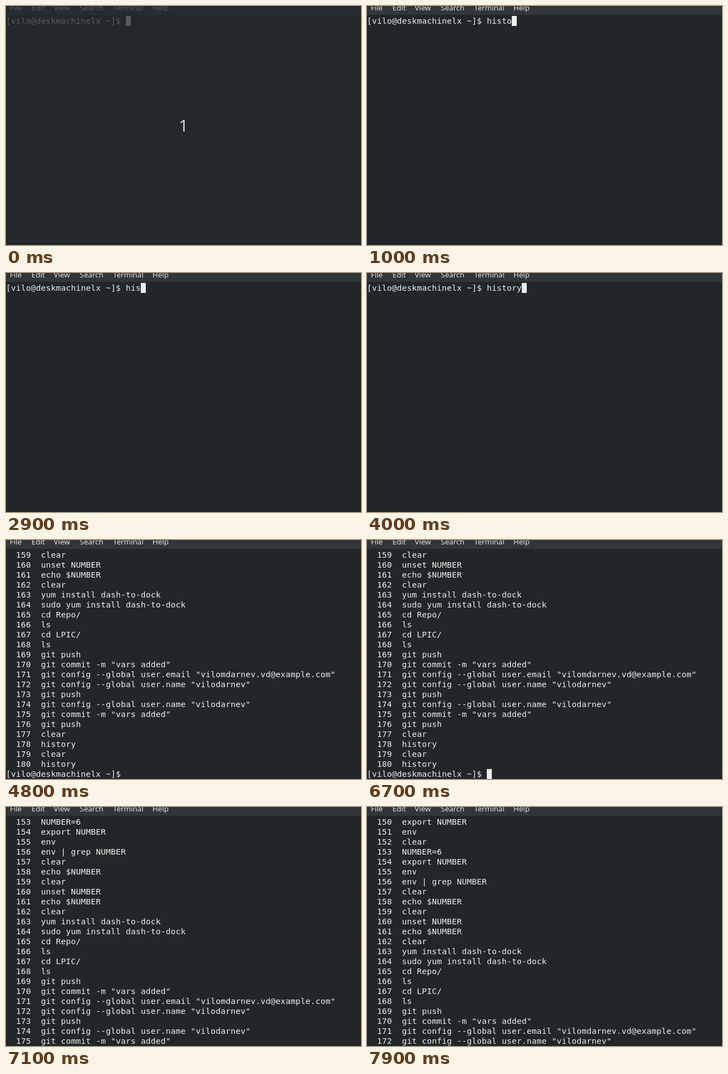
Animation of 640 by 432 pixels, one loop 8 s. Source, as an HTML page with a canvas:

```html
<!DOCTYPE html>
<html lang="en">
<head>
<meta charset="utf-8">
<title>Terminal history</title>
<style>
  html, body { margin: 0; height: 100%; overflow: hidden; background: #232629; }
  canvas { display: block; }
</style>
</head>
<body>
<canvas id="stage" width="640" height="432"></canvas>
<script>
const ctx = document.getElementById('stage').getContext('2d');
const LOOP = 8000, TICK = 100, CELL_W = 9, CELL_H = 18, TOP = 18, ROWS = 23;
const INK = '#eeeeec';
const UI_FONT = '"Open Sans", "Noto Sans", sans-serif';
const PROMPT = '[vilo@deskmachinelx ~]$ ';
const COMMAND = 'history';
const MENU = { File: 7, Edit: 46, View: 86, Search: 133, Terminal: 193, Help: 264 };

const FIRST = 150;
const history = `export NUMBER
env
clear
NUMBER=6
export NUMBER
env
env | grep NUMBER
clear
echo $NUMBER
clear
unset NUMBER
echo $NUMBER
clear
yum install dash-to-dock
sudo yum install dash-to-dock
cd Repo/
ls
cd LPIC/
ls
git push
git commit -m "vars added"
git config --global user.email "vilomdarnev.vd@example.com"
git config --global user.name "vilodarnev"
git push
git config --global user.name "vilodarnev"
git commit -m "vars added"
git push
clear
history
clear
history`.split('\n').map((cmd, i) => String(FIRST + i).padStart(5) + '  ' + cmd);
const output = [...history, PROMPT];

const OUTPUT_AT = 4200, PROMPT_AT = 4280;
const WHEEL = [7000, 7100, 7900], WHEEL_LINES = 3;
const BLINK_DELAY = 500, BLINK = 610;

// From each time on, the command is typed or deleted towards this length
const goals = [[0, 0], [300, 2], [800, 6], [1300, 7], [2500, 6], [2900, 0], [3200, 1], [3500, 7]];

// One key per tick forwards, up to three deletions per tick backwards
function typing(t) {
  let count = 0, lastKey = 0;
  for (let now = 0; now <= t; now += TICK) {
    const goal = goals.findLast(([start]) => start <= now)[1];
    if (count === goal) continue;
    count = goal > count ? count + 1 : Math.max(goal, count - 3);
    lastKey = now;
  }
  return { count, lastKey };
}

function cursorVisible(idle) {
  return idle < BLINK_DELAY || Math.floor((idle - BLINK_DELAY) / BLINK) % 2 === 1;
}

function rect(color, x, y, w, h) {
  ctx.fillStyle = color;
  ctx.fillRect(x, y, w, h);
}

function drawLine(text, row) {
  ctx.fillStyle = INK;
  [...text].forEach((ch, col) => ctx.fillText(ch, col * CELL_W, TOP + row * CELL_H + 14));
}

function drawCursor(col, row) {
  rect(INK, col * CELL_W, TOP + row * CELL_H, CELL_W, CELL_H);
}

function drawMenu() {
  rect('#31363a', 0, 0, 640, 16);
  ctx.font = '13.5px ' + UI_FONT;
  ctx.fillStyle = INK;
  for (const label in MENU) ctx.fillText(label, MENU[label], 8);
}

function drawCountdown() {
  rect('rgba(37, 40, 47, 0.75)', 0, 0, 640, 432);
  ctx.font = '30px ' + UI_FONT;
  ctx.fillStyle = '#dcdcdc';
  ctx.fillText('1', 311.5, 227);
}

function draw(t) {
  rect('#232629', 0, 0, 640, 432);
  drawMenu();
  ctx.font = '14.667px "DejaVu Sans Mono", monospace';
  if (t < OUTPUT_AT) {
    const { count, lastKey } = typing(t);
    drawLine(PROMPT + COMMAND.slice(0, count), 0);
    if (cursorVisible(t - lastKey)) drawCursor(PROMPT.length + count, 0);
  } else {
    const turns = WHEEL.filter(start => start <= t).length;
    const top = output.length - ROWS - turns * WHEEL_LINES;
    output.slice(top, top + ROWS).forEach(drawLine);
    if (!turns && cursorVisible(t - PROMPT_AT)) drawCursor(PROMPT.length, ROWS - 1);
  }
  if (t < TICK) drawCountdown();
}

const start = performance.now();
function frame() {
  const t = (performance.now() - start) % LOOP;
  draw(Math.floor(t / TICK) * TICK);
  requestAnimationFrame(frame);
}
frame();
</script>
</body>
</html>
```
